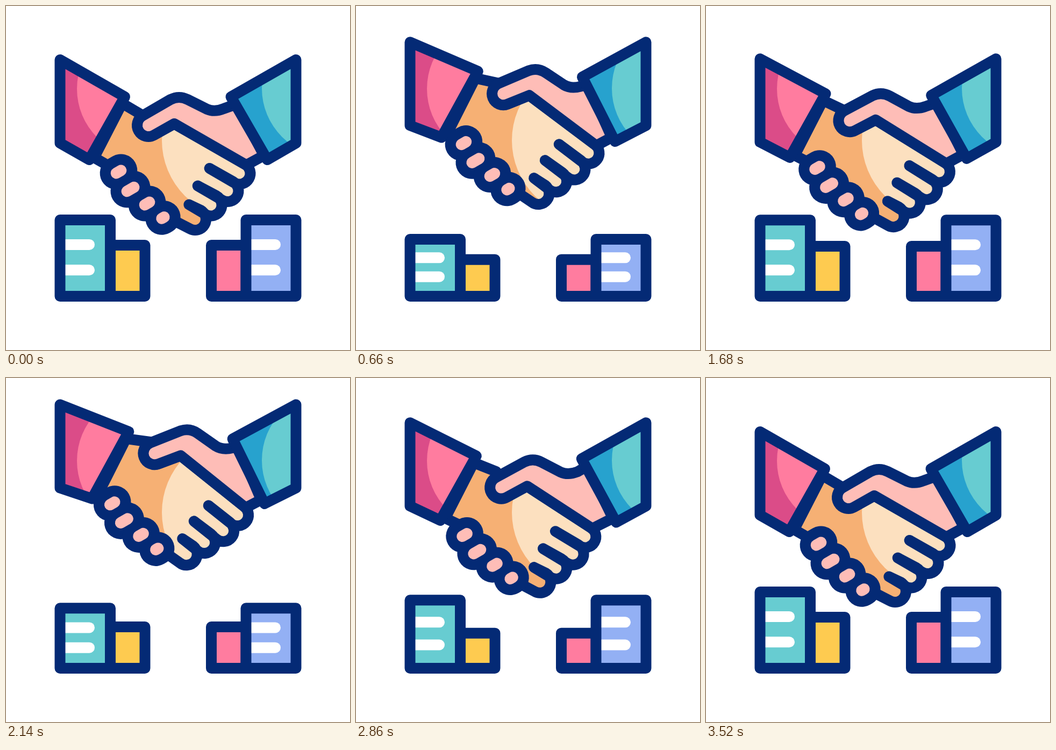
These frames come from a looping animation (640 by 640 pixels, 3.6 s). An HTML page with a canvas:

```html
<!DOCTYPE html>
<html lang="en">
<head>
<meta charset="utf-8">
<title>Handshake</title>
<style>
html, body { margin: 0; width: 100%; height: 100%; overflow: hidden; background: #fff; }
canvas { display: block; width: 640px; height: 640px; }
</style>
</head>
<body>
<canvas id="stage" width="640" height="640"></canvas>
<script>
const ctx = document.getElementById('stage').getContext('2d');
const LOOP = 3600, STEP = 20, LAST = 3520, BASE = 540;
const NAVY = '#042a75', ORANGE = '#f6b074', CREAM = '#fce0bf', SKIN = '#febdb7';
const PINK = '#ff7c9f', ROSE = '#db4c88', TEAL = '#67ccd1', BLUE = '#27a2ce';
const YELLOW = '#fecb50', LILAC = '#93b0f4';

// Turning times: low, high, low, high ...
const SHAKE = [0, 460, 940, 1345, 1725, 2190, 2610, 3030, 3440];
const TALL = [0, 770, 1740, 2310, 3290];
const LOW = [40, 1050, 1790, 2530, 3520];

// Left finger: x, y, half length of the pad, depth of the gap on the facing hand
const FINGERS = [[209.5, 308.5, 5, 53], [231.5, 341, 7.5, 53], [262.5, 367.5, 5, 36], [292, 394, 2.5, 0]];
const COS = Math.cos(Math.PI / 6), SIN = 0.5;

const ease = x => (1 - Math.cos(Math.PI * Math.min(1, Math.max(0, x)))) / 2;

function wave(turns, t) {
  const next = turns.findIndex(k => k > t);
  if (next < 1) return { level: 0, phase: 1, rising: false, cycle: -1 };
  const i = next - 1, rising = i % 2 === 0;
  const phase = (t - turns[i]) / (turns[next] - turns[i]);
  return { level: ease(rising ? phase : 1 - phase), phase, rising, cycle: i >> 1 };
}

// The shape trails the lift: it drags on the way up and relaxes late on the way down.
function poseAt(t) {
  const { level, phase, rising, cycle } = wave(SHAKE, t);
  const force = cycle === 3 ? 0.5 : 1;
  return {
    lift: 52 * force * level,
    bend: force * (rising ? ease(3 * phase - 1.5) : 1 - phase ** 2),
    drag: rising ? Math.sin(Math.PI * phase) ** 2 : 0
  };
}

function trace(points) {
  const p = new Path2D();
  points.forEach(q => p.lineTo(...q));
  p.closePath();
  return p;
}

function edge(path) {
  ctx.strokeStyle = NAVY;
  ctx.lineWidth = 20;
  ctx.stroke(path);
}

function shape(path, fill, light, x, y, r) {
  ctx.fillStyle = fill;
  ctx.fill(path);
  if (light) {
    ctx.save();
    ctx.clip(path);
    ctx.fillStyle = light;
    ctx.beginPath();
    ctx.arc(x, y, r, 0, 7);
    ctx.fill();
    ctx.restore();
  }
  edge(path);
}

// A rounded bar around (x, y), reaching (dx, dy) both ways
function pill(x, y, dx, dy, width, color) {
  ctx.strokeStyle = color;
  ctx.lineWidth = width;
  ctx.beginPath();
  ctx.moveTo(x - dx, y - dy);
  ctx.lineTo(x + dx, y + dy);
  ctx.stroke();
}

function building(x, width, height, fill, windows) {
  const top = BASE - height;
  const walls = trace([[x, top], [x + width, top], [x + width, BASE], [x, BASE]]);
  ctx.fillStyle = fill;
  ctx.fill(walls);
  for (let i = 1; i <= windows; i++) {
    pill(x + 32, BASE - height * (i + 0.03) / 3, 22.5, 0, 20, '#fff');
  }
  edge(walls);
}

function draw(t) {
  const { lift, bend, drag } = poseAt(t);
  const cuffBend = bend + drag / 3;
  const turn = 0.15 * bend;

  const cuff = (x, y, dx, dy) => [x + dx * cuffBend, y - lift + dy * cuffBend];
  // The clasped hand swings about the right wrist.
  const hand = (x, y) => [
    x - turn * (y - 295) + drag * (7.5 * Math.tanh((255 - y) / 30) - 1.5),
    y - lift + turn * (x - 475) + drag * 1.5
  ];
  const finger = (x, y) => [
    x - 11 * bend + drag * (0.06 * (x - 209) - 7),
    y - lift - 25 * bend + drag * (3 - 0.07 * (x - 209))
  ];

  ctx.fillStyle = '#fff';
  ctx.fillRect(0, 0, 640, 640);
  ctx.lineCap = ctx.lineJoin = 'round';

  const tall = 142 - 38 * wave(TALL, t).level, low = 95 - 39.5 * wave(LOW, t).level;
  building(194, 64.5, low, YELLOW, 0);
  building(100.5, 93.5, tall, TEAL, 2);
  building(382, 64.5, low, PINK, 0);
  building(446.5, 93, tall, LILAC, 2);

  // Palm; its fingertips mirror the left fingers
  const palm = trace([]);
  const palmTo = points => points.forEach(q => palm.lineTo(...q));
  palmTo([cuff(216, 181, 7, -17), cuff(255, 204, 14, -33), hand(275, 240), hand(313, 219)]);
  for (const [fx, fy, , gap] of FINGERS) {
    const x = 644 - fx, y = fy + 3;
    palm.arc(...hand(x, y), 20, turn - Math.PI / 3, turn + Math.PI * 2 / 3);
    if (gap) palmTo([hand(x - 10 - gap * COS, y + 17 - gap * SIN)]);
  }
  palmTo([hand(310, 398), finger(292, 394), finger(209, 308),
    cuff(192, 298, -10, -25), cuff(164, 282, 5, -11)]);
  palm.closePath();
  shape(palm, ORANGE, CREAM, 436, 250, 146);

  // Right hand with the thumb
  const grip = new Path2D();
  const gripTo = points => points.forEach(q => grip.lineTo(...q));
  gripTo([cuff(430, 182, 2, -4), hand(405, 191)]);
  grip.quadraticCurveTo(...hand(388, 198), ...hand(374, 192));
  gripTo([hand(338, 174)]);
  grip.quadraticCurveTo(...hand(322, 166), ...hand(306, 174));
  grip.arc(...hand(265, 222), 21, turn - Math.PI * 2 / 3, turn + Math.PI / 3, true);
  gripTo([hand(313, 219), hand(447, 296), cuff(480, 278, -5, -1)]);
  grip.closePath();
  shape(grip, SKIN);

  for (const [width, color] of [[61, NAVY], [21, SKIN]]) {
    for (const [x, y, half] of FINGERS) {
      pill(...finger(x, y), half * COS, -half * SIN, width, color);
    }
  }

  const sleeve = (x, top, bottom) => trace([[x, 100 - lift], top, bottom, [x, 255 - lift]]);
  shape(sleeve(100.5, cuff(221, 169, 7, -18), cuff(155, 286, 5, -10.5)), ROSE, PINK, 260, 154, 128);
  shape(sleeve(539.5, cuff(418.5, 169, 3, -5), cuff(486, 286, -5, -1.5)), BLUE, TEAL, 604, 153, 128);
}

const start = performance.now();
function tick() {
  const t = (performance.now() - start) % LOOP;
  draw(Math.min(LAST, Math.floor(t / STEP) * STEP));
  requestAnimationFrame(tick);
}
tick();
</script>
</body>
</html>
```
